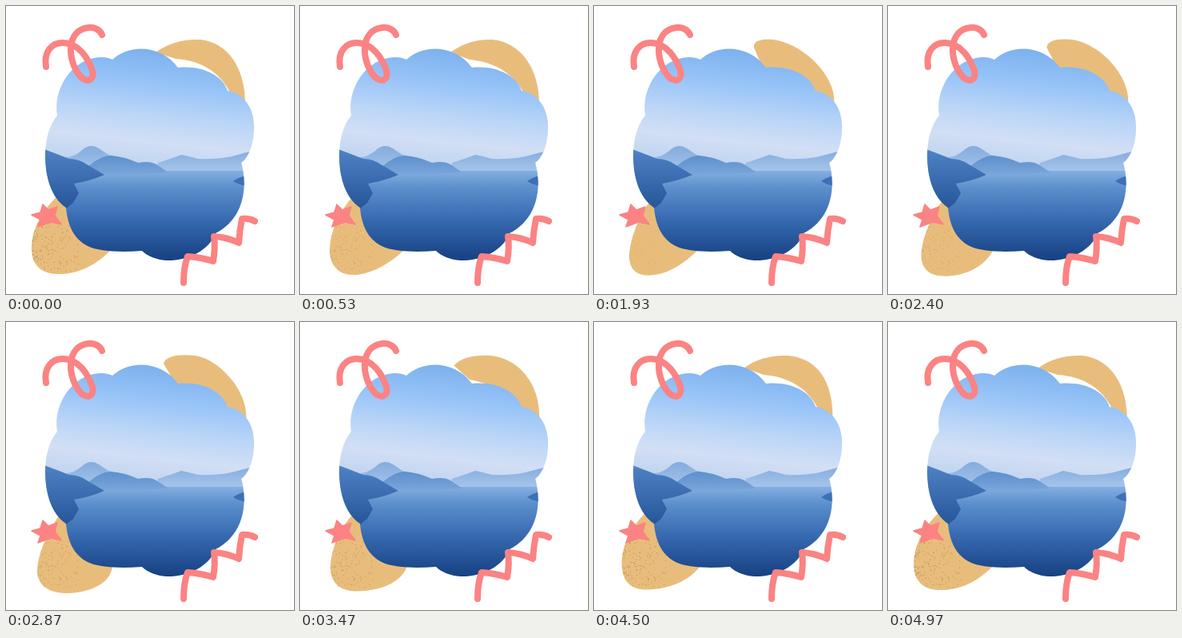
Animation, 360 px wide and 360 px high, one loop 5 s. Source, as an HTML page:

```html
<!DOCTYPE html>
<html lang="en">
<head>
<meta charset="utf-8">
<title>Cloud frame with wobbling shapes</title>
<style>
  html, body { margin: 0; width: 100%; height: 100%; overflow: hidden; background: #fff; }
  svg { display: block; width: 100vw; height: 100vh; }
  .top { animation: top 5s linear infinite; }
  .low { animation: low 5s linear infinite; }
  .texture { animation: fade 5s linear infinite; }
  .sand { fill: #e8bd7c; }
  .ribbon { fill: none; stroke: #fb8383; stroke-linecap: round; stroke-linejoin: round; }

  @keyframes top {
    0%, 100% { d: path("M187 58C203 46 222 41 243 42C278 46 299 78 299 122L280 108C268 84 245 68 212 66Z"); }
    10.6% { d: path("M188 58C204 46 222 41 241 42C277 46 299 79 299 122L280 109C268 86 245 70 212 67Z"); }
    26.6% { d: path("M193 56C201 44 218 39 238 42C275 49 299 84 299 122L280 118C268 100 245 90 212 80Z"); }
    38.6% { d: path("M200 52C198 42 214 40 230 43C268 52 304 92 300 123L280 118C268 100 245 90 212 80Z"); }
    57.4% { d: path("M197 52C199 42 218 40 237 42C270 48 304 90 300 123L280 118C268 100 245 88 212 78Z"); }
    81.4% { d: path("M188 57C204 45 223 42 240 42C282 44 299 72 298 122L280 108C268 85 245 69 212 66Z"); }
  }
  @keyframes low {
    0%, 100% { d: path("M66 236C44 256 32 280 32 304C33 328 48 336 70 335C94 334 114 322 130 306L110 250Z"); }
    10.6% { d: path("M66 238C48 258 38 282 37 304C37 328 52 338 72 336C94 333 114 320 129 306L110 250Z"); }
    26.6% { d: path("M70 244C58 262 46 294 45 318C45 334 54 340 70 337C92 333 112 320 128 306L110 250Z"); }
    38.6% { d: path("M70 244C56 262 44 294 44 314C45 332 56 339 76 336C94 334 112 322 129 306L110 250Z"); }
    57.4% { d: path("M68 240C54 258 40 288 39 310C39 332 56 339 78 339C104 338 130 328 133 306L110 250Z"); }
    81.4% { d: path("M66 238C48 256 37 278 37 302C38 326 48 334 66 334C92 334 122 326 134 306L110 250Z"); }
  }
  @keyframes fade {
    0%, 81.4%, 100% { opacity: 1; }
    10.6% { opacity: .6; }
    26.6%, 38.6% { opacity: .22; }
    57.4% { opacity: .8; }
  }
</style>
</head>
<body>
<svg viewBox="0 0 360 360">
  <defs>
    <linearGradient id="sky" gradientUnits="userSpaceOnUse" x1="175" y1="52" x2="158" y2="206">
      <stop offset="0" stop-color="#7bb0ee"/>
      <stop offset=".3" stop-color="#99c5f8"/>
      <stop offset=".55" stop-color="#bcd6f7"/>
      <stop offset=".75" stop-color="#d2dff5"/>
      <stop offset="1" stop-color="#bdd2ee"/>
    </linearGradient>
    <linearGradient id="water" gradientUnits="userSpaceOnUse" x1="0" y1="204" x2="0" y2="320">
      <stop offset="0" stop-color="#88b2e2"/>
      <stop offset=".2" stop-color="#5c8fcc"/>
      <stop offset=".55" stop-color="#3669b0"/>
      <stop offset="1" stop-color="#153f80"/>
    </linearGradient>
    <linearGradient id="far" x2="0" y2="1">
      <stop offset="0" stop-color="#84acdf"/>
      <stop offset="1" stop-color="#a5c4e9"/>
    </linearGradient>
    <linearGradient id="hill" x2="0" y2="1">
      <stop offset="0" stop-color="#5d90cd"/>
      <stop offset="1" stop-color="#79a5da"/>
    </linearGradient>
    <linearGradient id="near" x2="0" y2="1">
      <stop offset="0" stop-color="#4f83c6"/>
      <stop offset="1" stop-color="#255598"/>
    </linearGradient>
    <pattern id="stripes" width="40" height="15" patternUnits="userSpaceOnUse" patternTransform="rotate(-32 250 70)">
      <path d="M0 7H40" stroke="#c2985c"/>
    </pattern>
    <clipPath id="cloud">
      <path d="M64 137C59 110 76 72 110 65C119 63 127 64 133 67C154 47 194 48 215 77C243 74 270 85 277 106C298 109 311 129 310 153C310 171 304 189 294 196C302 224 299 265 262 284C254 306 226 319 200 318C188 317 177 313 170 306C142 308 116 307 102 300C83 290 77 272 75 252C57 240 49 214 49 187C49 167 54 149 64 137Z"/>
    </clipPath>
    <clipPath id="lowClip"><path class="low"/></clipPath>
  </defs>

  <path class="top sand"/>
  <path class="top texture" fill="url(#stripes)"/>
  <path class="low sand"/>
  <g clip-path="url(#lowClip)"><path id="grain" class="texture" stroke="#b8935b" stroke-width="1.2" stroke-linecap="round"/></g>

  <g clip-path="url(#cloud)">
    <rect x="40" y="45" width="280" height="165" fill="url(#sky)"/>
    <rect x="40" y="204" width="280" height="120" fill="url(#water)"/>
    <path fill="url(#far)" d="M188 206L190 196Q206 191 219 186Q230 188 240 191Q262 192 282 188L312 180V206Z"/>
    <path fill="url(#far)" d="M60 207L76 189Q86 188 94 181Q105 171 116 178L128 186L150 191L168 207Z"/>
    <path fill="url(#hill)" d="M88 210L106 198Q118 188 130 187Q148 188 165 196Q180 193 188 198L203 208Q160 211 120 210Z"/>
    <path fill="url(#near)" d="M45 178Q64 185 79 191Q91 191 101 198L123 211Q104 219 85 222L91 234L84 246L74 254L45 235Z"/>
    <path fill="#3d70b5" d="M302 211Q291 214 284 219Q291 224 302 225Z"/>
  </g>

  <path class="ribbon" stroke-width="8" d="M50 76C47 57 57 46 71 46C91 46 103 66 108 81C111 94 100 96 93 88C76 68 75 30 103 27C112 26 118 31 120 36"/>
  <path class="ribbon" stroke-width="8" d="M222 346C222 333 224 321 227 313Q243 314 259 319Q262 302 260 288Q276 289 291 296Q292 280 295 266Q304 265 311 269"/>
  <path fill="#fb8383" stroke="#fb8383" stroke-width="1.5" stroke-linejoin="round" d="M46 248L53 255L64 251L61 262L69 273L56 270L40 276L43 267L32 261L43 258Z"/>
</svg>
<script>
  // Seeded speckles, densest toward the left edge.
  let seed = 17;
  const rand = () => (seed = seed * 16807 % 2147483647) / 2147483647;
  let dots = "";
  for (let i = 0; i < 210; i++) {
    const x = 33 + 58 * rand() ** 1.8;
    const y = 268 + 64 * rand();
    dots += `M${x.toFixed(1)} ${y.toFixed(1)}h.01`;
  }
  document.getElementById("grain").setAttribute("d", dots);
</script>
</body>
</html>
```
